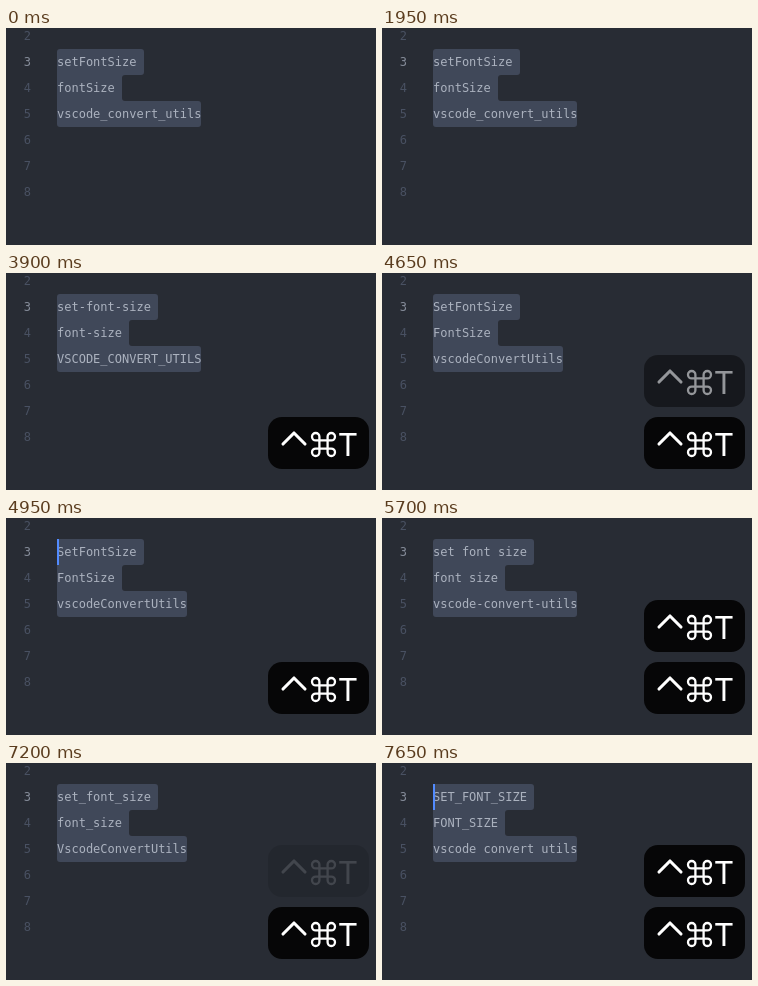
Recreate the animation shown at these times as an HTML page. Size 370 by 217 pixels, loop 8000 ms.

```html
<!DOCTYPE html>
<html lang="en">
<head>
<meta charset="utf-8">
<title>Case conversion</title>
<style>
  html, body { margin: 0; width: 100%; height: 100%; overflow: hidden; background: #282c34; }
  svg { display: block; width: 370px; height: 217px; }
  text { white-space: pre; }
  .code { font: 12px "DejaVu Sans Mono", "Liberation Mono", monospace; fill: #abb2bf; }
  .num { fill: #495162; }
  .active { fill: #858c99; }
  .letter { font: 31.5px Inter, Roboto, sans-serif; fill: #fff; }
</style>
</head>
<body>
<svg viewBox="0 0 370 217">
  <defs>
    <g id="key">
      <rect width="101" height="52" rx="14" fill="#060607"/>
      <g fill="none" stroke="#fff">
        <path d="M15 27 L26 16 L37 27" stroke-width="3.1" stroke-linecap="round" stroke-linejoin="round"/>
        <path id="command" transform="translate(55.5 27.5)" stroke-width="2.3"/>
      </g>
      <text class="letter" x="80" y="39" text-anchor="middle">T</text>
    </g>
  </defs>
  <rect width="370" height="217" fill="#282c34"/>
  <g id="numbers"></g>
  <path id="selection" fill="#404859"/>
  <g id="lines"></g>
  <rect id="cursor" x="51" y="21" width="2" height="26" fill="#528bff"/>
  <use id="oldKey" href="#key" x="262" y="82"/>
  <use id="newKey" href="#key" x="262" y="144"/>
</svg>
<script>
const LOOP = 8000, LEFT = 51, TOP = 21, ROW = 26, CHAR = 7.224;
const $ = id => document.getElementById(id);

// Each step: start time, then the three lines of code.
const steps = [
  [0, "setFontSize", "fontSize", "vscode_convert_utils"],
  [2700, "set-font-size", "font-size", "VSCODE_CONVERT_UTILS"],
  [4050, "SetFontSize", "FontSize", "vscodeConvertUtils"],
  [5100, "set font size", "font size", "vscode-convert-utils"],
  [6300, "set_font_size", "font_size", "VscodeConvertUtils"],
  [7650, "SET_FONT_SIZE", "FONT_SIZE", "vscode convert utils"]
];
const blinks = [450, 900, 1350, 1950, 2400, 2850, 3450, 3900,
                4050, 4500, 4950, 5700, 6150, 6750, 7350];
// Time and opacity of the upper key.
const fades = [[0, 0], [4050, 1], [4650, .5], [4800, 0], [5100, 1], [6000, .12],
               [6150, 0], [6300, 1], [7200, .12], [7350, 0], [7650, 1]];

const at = (list, t) => list.filter(item => item[0] <= t).pop();

function addText(parent, x, row, cls, content) {
  const el = document.createElementNS("http://www.w3.org/2000/svg", "text");
  el.setAttribute("x", x);
  el.setAttribute("y", 38 + row * ROW);
  el.setAttribute("class", cls);
  el.textContent = content;
  $(parent).append(el);
  return el;
}

// Closed outline with rounded corners, both convex and concave.
function roundPath(points, r) {
  const n = points.length;
  const toward = ([x, y], [u, v]) => {
    const k = r / Math.hypot(u - x, v - y);
    return [x + (u - x) * k, y + (v - y) * k];
  };
  return points.map((p, i) => {
    const a = toward(p, points[(i + n - 1) % n]);
    const b = toward(p, points[(i + 1) % n]);
    return `${i ? "L" : "M"}${a} Q${p} ${b}`;
  }).join(" ") + "Z";
}

function selectionPath(lines) {
  const outline = [[LEFT, TOP]];
  lines.forEach((line, i) => {
    const chars = line.length + (i < 2 ? 1 : 0);
    const right = Math.round(LEFT + chars * CHAR);
    outline.push([right, TOP + i * ROW], [right, TOP + (i + 1) * ROW]);
  });
  outline.push([LEFT, TOP + 3 * ROW]);
  return roundPath(outline, 3);
}

function commandPath() {
  const s = 4.1, r = 3.7, c = s + r;
  const arc = `A${r} ${r} 0 1 1 `;
  return `M${-s} ${-s}H${s}V${-c}${arc}${c} ${-s}H${s}V${s}H${c}${arc}${s} ${c}` +
         `V${s}H${-s}V${c}${arc}${-c} ${s}H${-s}V${-s}H${-c}${arc}${-s} ${-c}Z`;
}

$("command").setAttribute("d", commandPath());
for (let n = 2; n <= 8; n++) {
  addText("numbers", 17.8, n - 3, n === 3 ? "code active" : "code num", n);
}
const rows = [0, 1, 2].map(i => addText("lines", LEFT, i, "code", ""));
let shown;

function draw(t) {
  const step = at(steps, t);
  if (step !== shown) {
    const lines = step.slice(1);
    rows.forEach((row, i) => { row.textContent = lines[i]; });
    $("selection").setAttribute("d", selectionPath(lines));
    shown = step;
  }
  $("cursor").setAttribute("opacity", blinks.filter(b => b <= t).length % 2);
  $("oldKey").setAttribute("opacity", at(fades, t)[1]);
  $("newKey").setAttribute("opacity", t >= 2700 ? 1 : 0);
}

const start = performance.now();
function tick() {
  draw((performance.now() - start) % LOOP);
  requestAnimationFrame(tick);
}
tick();
</script>
</body>
</html>
```
